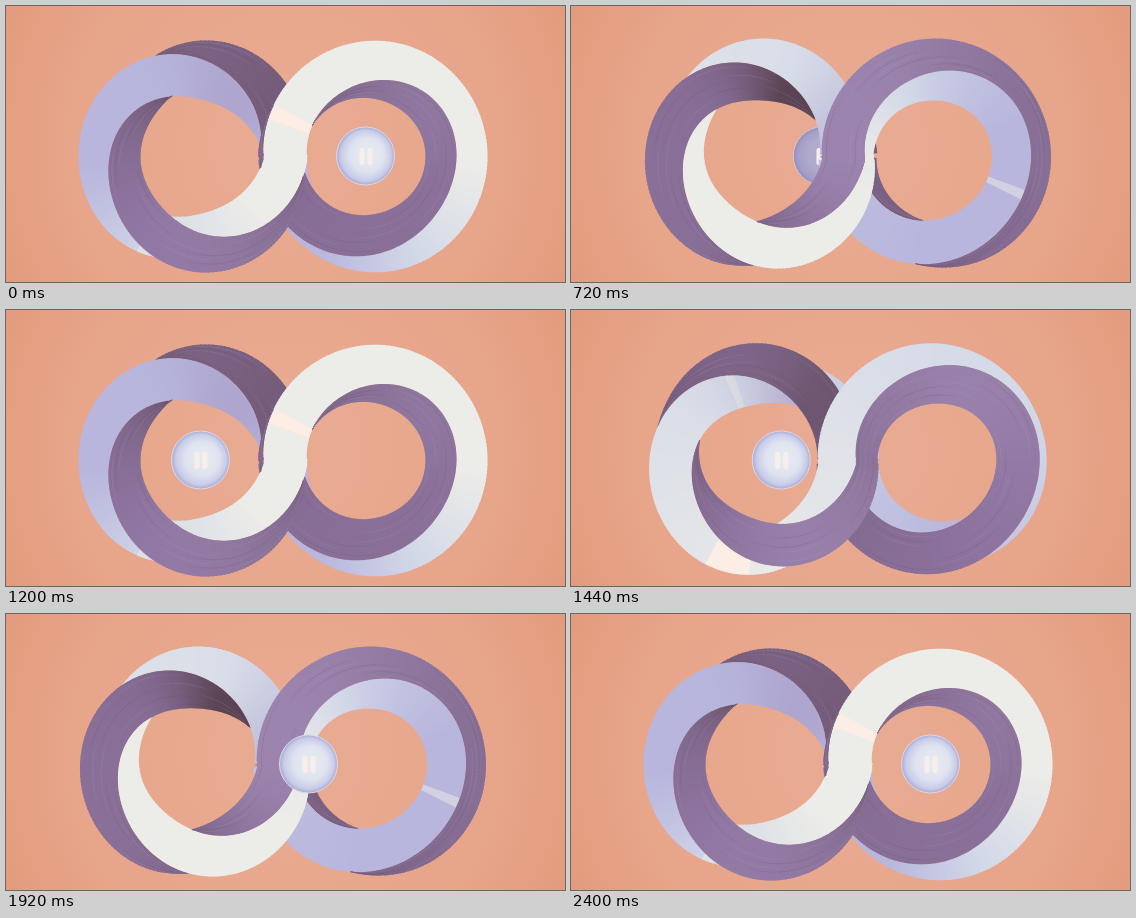
These frames come from a looping animation (559 by 276 pixels, 2460 ms). An HTML page with a canvas:

```html
<!DOCTYPE html>
<html>
<head>
<meta charset="utf-8">
<style>
  html, body { margin: 0; width: 100%; height: 100%; overflow: hidden; background: #e7a68b; }
  canvas { display: block; }
</style>
</head>
<body>
<canvas id="stage" width="559" height="276"></canvas>
<script>
const ctx = document.getElementById('stage').getContext('2d');
const RAD = Math.PI / 180;
const sin = d => Math.sin(d * RAD), cos = d => Math.cos(d * RAD);
const clamp = (x, lo = 0, hi = 1) => Math.min(hi, Math.max(lo, x));
const mod = (x, n) => ((x % n) + n) % n;
const RADIUS = 87, CORNER = 31, MID_X = 277, MID_Y = 150.5, LOOP_X = 86.5;
const STEP = 2;

const LAVENDER = [184, 182, 221], PALE = [210, 216, 232], WHITE = [236, 236, 232];
const CREAM = [252, 237, 229], DARK = [91, 68, 84];
const PURPLE = [143, 117, 161], LILAC = [157, 134, 176], STREAK = [190, 165, 200];
const mix = (a, b, k) => a.map((x, i) => x + (b[i] - x) * k);
const rgb = c => `rgb(${c.map(Math.round)})`;

// The path runs along two touching circles: s = -180..180 right, 180..540 left.
function pathAt(s) {
  const along = mod(s + 180, 720) - 180;
  const left = along > 180;
  const angle = left ? along - 360 : along;
  const side = left ? -1 : 1;
  return { along, left, angle, side, dx: side * cos(angle), dy: -sin(angle) };
}

// Roll of the square section; the uneven part is symmetric about the front crossing.
function tilt(path, p) {
  const d = path.along - 180;
  const sway = -3.4 * cos(d / 2) - 6.8 * cos(1.5 * d) + 3.4 * cos(2.5 * d);
  return 180 * p + sway + (path.left ? 135 + 0.75 * path.angle : 45 - path.angle / 4);
}

// Screen point on one face; f goes from 0 to 1 across it.
function facePoint(s, p, face, f) {
  const path = pathAt(s), psi = tilt(path, p) + 90 * face;
  const v = CORNER * (sin(psi - 45) * (1 - f) + sin(psi + 45) * f);
  const r = RADIUS + path.side * v;
  return [MID_X + path.side * LOOP_X + path.dx * r, MID_Y + path.dy * r];
}

function lightColor(s, p, nx) {
  const w = 0.8 * cos(360 * (p - 0.93)) * cos((s - 60) / 2)
    + 0.5 * cos((s - 225) / 2) + 0.2 * nx;
  const color = mix(PALE, w < 0 ? LAVENDER : WHITE, clamp(Math.abs(w) / 0.55));
  const travel = 720 * (p - 0.8);
  const glint = travel + 17 * sin(travel / 2) + 6 * (cos(travel / 2) - 1);
  const distance = x => Math.abs(mod(s - x + 360, 720) - 360);
  if (distance(glint) < 9 + 5 * cos(travel)) return CREAM;
  return distance(glint + 142) < 3 ? mix(color, WHITE, 0.5) : color;
}

function purpleColor(s, nz, ny, shadow) {
  const front = cos((s - 140) / 2);
  const base = mix(PURPLE, LILAC, clamp(front * nz));
  const dark = 0.32 - 0.32 * nz + 0.2 * clamp(-front) + shadow * (0.4 + 0.4 * ny);
  return mix(base, DARK, clamp(dark));
}

function drawSegment(s, p) {
  const path = pathAt(s + STEP / 2), { along, side } = path;
  const shadow = Math.exp(-(((along - 485) / 55) ** 2));
  for (let face = 0; face < 4; face++) {
    const psi = tilt(path, p) + 90 * face, nz = cos(psi);
    if (nz <= 0) continue;
    const nx = side * path.dx * sin(psi), ny = side * path.dy * sin(psi);
    const purple = face % 2 === 1;
    const color = purple
      ? purpleColor(along, nz, ny, shadow)
      : mix(lightColor(along, p, nx), PURPLE, 0.25 * shadow * clamp(0.5 + ny));
    ctx.fillStyle = rgb(color);
    ctx.beginPath();
    for (const [ds, f] of [[-0.4, 0], [-0.4, 1], [STEP + 0.4, 1], [STEP + 0.4, 0]])
      ctx.lineTo(...facePoint(s + ds, p, face, f));
    ctx.fill();
    if (purple) drawStreaks(s, p, face, color);
  }
}

function drawStreaks(s, p, face, color) {
  ctx.lineWidth = 0.7;
  for (let j = 1; j < 9; j++) {
    const wave = sin((s - 720 * p) / 2 * (5 + j % 4) + j * 137);
    if (wave < 0.25) continue;
    ctx.strokeStyle = rgb(mix(color, j % 2 ? STREAK : DARK, 0.3 * wave));
    ctx.beginPath();
    ctx.moveTo(...facePoint(s, p, face, j / 9));
    ctx.lineTo(...facePoint(s + STEP, p, face, j / 9));
    ctx.stroke();
  }
}

// The strand through the front crossing (s = 180) is painted last.
function drawRibbon(p) {
  for (let k = 360; k > 0; k -= STEP) {
    drawSegment(180 - k, p);
    drawSegment(180 + k - STEP, p);
  }
}

function drawBall(phase) {
  const x = MID_X + 82.5 * cos(phase), y = 150, r = 29;
  const shade = ctx.createRadialGradient(x + 4, y - 3, 3, x, y, r);
  shade.addColorStop(0, '#e6ebf0');
  shade.addColorStop(0.55, '#dee3f0');
  shade.addColorStop(0.85, '#c8cce8');
  shade.addColorStop(1, '#a9abd5');
  ctx.fillStyle = shade;
  ctx.beginPath();
  ctx.arc(x, y, r, 0, 7);
  ctx.fill();
  ctx.strokeStyle = '#dcd9e8';
  ctx.lineWidth = 1;
  ctx.stroke();
  const dim = Math.exp(-(((phase - 105) / 25) ** 2));
  ctx.fillStyle = `rgba(128,110,165,${0.5 * dim})`;
  ctx.fill();
  ctx.fillStyle = '#f8efeb';
  for (const dx of [-6, 2]) {
    ctx.beginPath();
    ctx.roundRect(x + dx, y - 8, 5, 17, 2);
    ctx.fill();
  }
}

function drawBackground() {
  const glow = ctx.createRadialGradient(280, 140, 60, 280, 140, 320);
  glow.addColorStop(0, '#e8aa91');
  glow.addColorStop(0.6, '#e7a58a');
  glow.addColorStop(1, '#e39a7b');
  ctx.fillStyle = glow;
  ctx.fillRect(0, 0, 559, 276);
}

let shown = -1;
function render() {
  const tick = Math.floor((performance.now() % 2460) / 60);
  if (tick !== shown) {
    shown = tick;
    const phase = (tick % 40) * 9, behind = phase < 180;
    drawBackground();
    if (behind) drawBall(phase);
    drawRibbon((tick % 20) / 20);
    if (!behind) drawBall(phase);
  }
  requestAnimationFrame(render);
}
render();
</script>
</body>
</html>
```
